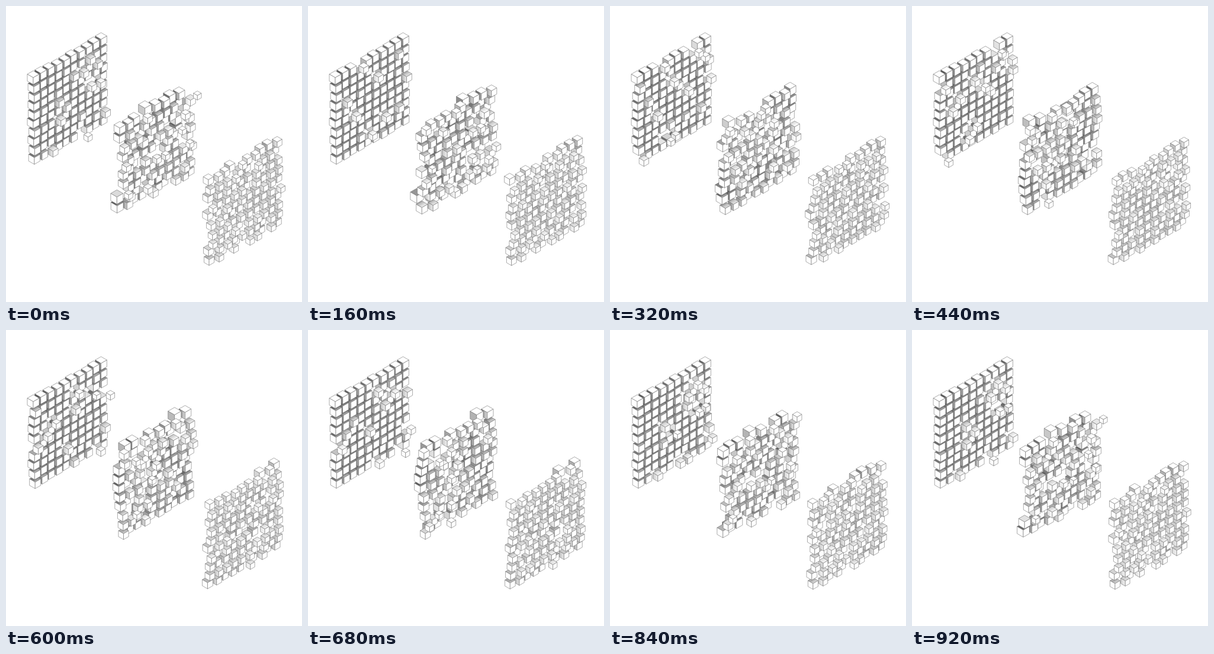
Recreate the animation shown at these times as an HTML page with a canvas. Size 500 by 500 pixels, loop 0.96 s.

```html
<!DOCTYPE html>
<html>
<head>
<meta charset="utf-8">
<style>
  html, body { margin: 0; width: 100%; height: 100%; overflow: hidden; background: #fff; }
  canvas { display: block; width: 500px; height: 500px; }
</style>
</head>
<body>
<canvas id="stage" width="500" height="500"></canvas>
<script>
const ctx = document.getElementById('stage').getContext('2d');
const N = 10, LOOP = 960, STEP = 40, TAU = Math.PI * 2, COS = Math.sqrt(3) / 2;

let seed = 11;
function random() {
  seed = (seed * 16807) % 2147483647;
  return seed / 2147483647;
}
const clamp = (v, lo, hi) => Math.max(lo, Math.min(hi, v));
const mix = (a, b, k) => a + (b - a) * k;
const grid = make => Array.from({ length: N }, (_, c) => Array.from({ length: N }, (_, r) => make(c, r)));

// Eases out and back around the peak; p is a phase of the loop
function pulse(p, peak) {
  const d = Math.abs((p - peak + 1.5) % 1 - 0.5) / 0.24;
  return d < 1 ? Math.cos(d * Math.PI / 2) ** 2 : 0;
}

// Each cube rests near `rest`, sways by `sway`, and by `chance` makes one move of up to `reach`
function makeWall(index, { rest, jitter, sway, chance, reach }) {
  const cells = grid(() => ({
    rest: rest + jitter * random(),
    phase: random() * TAU,
    twist: random() * TAU,
    peak: random(),
    reach: random() < chance ? reach * mix(0.4, 1, random()) : 0
  }));
  return {
    x: 46 + 144 * index,
    y: 121 + 84 * index,
    heights: p => grid((c, r) => {
      const k = cells[c][r];
      const swing = Math.sin(TAU * p + k.phase) + 0.5 * Math.sin(2 * TAU * p + k.twist);
      return clamp(k.rest + sway * swing + k.reach * pulse(p, k.peak), -7, 23);
    })
  };
}

const walls = [
  { rest: 0, jitter: 3, sway: 0, chance: 0.42, reach: 22 },
  { rest: -1, jitter: 8, sway: 5, chance: 0.55, reach: 18 },
  { rest: 9, jitter: 8, sway: 2.5, chance: 0.2, reach: -13 }
].map((style, i) => makeWall(i, style));

const edge = z => 11.6 - 0.17 * z;

function face(points, fill) {
  ctx.beginPath();
  points.forEach(([x, y]) => ctx.lineTo(x, y));
  ctx.closePath();
  ctx.fillStyle = fill;
  ctx.fill();
  ctx.stroke();
}

// Occlusion: darkest behind the neighbour's front, weaker for wide gaps and uneven pairs
function shade(x, y, z, neighbour, dx, dy) {
  if (neighbour === undefined) return '#fff';
  const b = edge(neighbour), from = neighbour + b / 2 - 4 - z, length = 15 * COS;
  const px = x + from * COS, py = y + from / 2;
  const tight = clamp(((edge(z) + b) / 2 - 6) / 5.6, 0.3, 1) ** 2;
  const depth = 165 * tight * (1 - clamp(Math.abs(neighbour - z) / 32, 0, 0.6));
  const g = ctx.createLinearGradient(px, py, px + dx * length, py + dy * length);
  const grey = k => `hsl(0 0% ${100 - depth * k / 2.55}%)`;
  g.addColorStop(0, grey(1));
  g.addColorStop(0.3, grey(0.55));
  g.addColorStop(1, '#fff');
  return g;
}

function cube(x, y, z, left, above) {
  const a = edge(z), w = a * COS, h = a / 2;
  const mid = [x, y], top = [x, y - a], bottom = [x, y + a];
  const ul = [x - w, y - h], ur = [x + w, y - h], ll = [x - w, y + h], lr = [x + w, y + h];
  face([top, ur, mid, ul], shade(x, y - h, z, above, 0.5, COS));
  face([ul, mid, bottom, ll], shade(x - w / 2, y + a / 4, z, left, 1, 0));
  face([mid, ur, lr, bottom], '#fff');
}

function draw(p) {
  ctx.fillStyle = '#fff';
  ctx.fillRect(0, 0, 500, 500);
  ctx.strokeStyle = '#666';
  ctx.lineWidth = 0.55;
  ctx.lineJoin = 'round';
  for (const wall of walls) {
    const z = wall.heights(p);
    // Back to front: the left and upper neighbours are nearer
    for (let c = N - 1; c >= 0; c--) {
      for (let r = N - 1; r >= 0; r--) {
        const out = z[c][r];
        const x = wall.x + 12.6 * c + out * COS;
        const y = wall.y - 7.25 * c + 14.9 * r + out / 2;
        cube(x, y, out, z[c - 1]?.[r], z[c][r - 1]);
      }
    }
  }
}

const start = performance.now();
function tick() {
  const t = (performance.now() - start) % LOOP;
  draw(Math.floor(t / STEP) * STEP / LOOP);
  requestAnimationFrame(tick);
}
tick();
</script>
</body>
</html>
```
